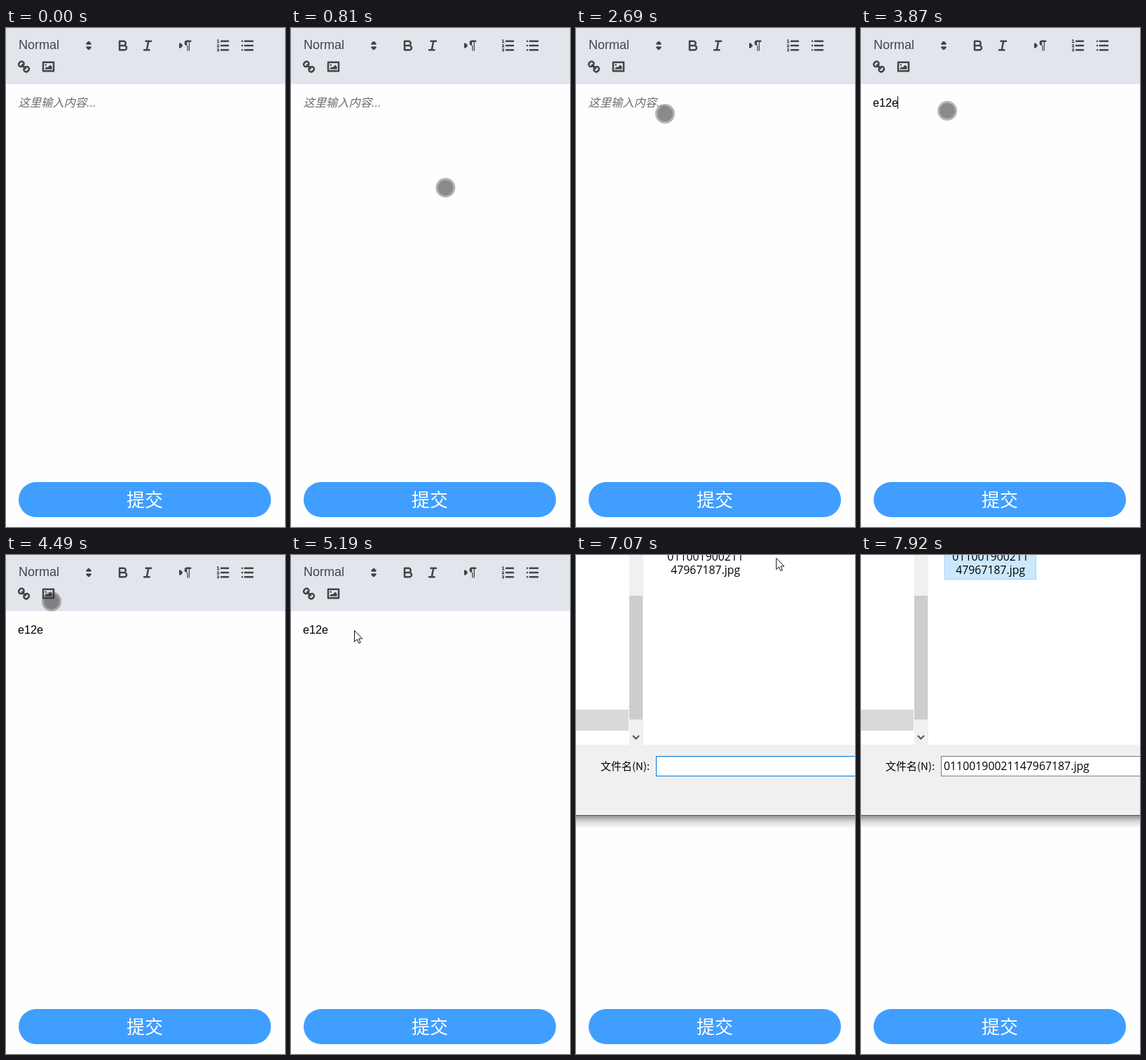
An HTML page that plays this animation: 398x710 px, repeating every 8000 ms.

```html
<!DOCTYPE html>
<html lang="zh-CN">
<head>
<meta charset="utf-8">
<title>Editor</title>
<style>
  html, body { margin: 0; width: 100%; height: 100%; overflow: hidden; background: #fefefe; }
  #stage { display: block; width: 398px; height: 710px; }
  text { white-space: pre; }
  .page { font-family: "Liberation Sans", "Noto Sans CJK SC", "Noto Sans CJK", sans-serif; font-size: 16.25px; }
  .cjk { font-family: "Noto Sans CJK SC", "Noto Sans CJK", sans-serif; }
  .file { font-family: "Open Sans", "Noto Sans", sans-serif; font-size: 15.85px; }
  .icon { fill: none; stroke: #444; stroke-width: 2; stroke-linecap: round; stroke-linejoin: round; }
  .icon .thin { stroke-width: 1; }
  .icon .solid { fill: #444; stroke: none; }
  .icon .both { fill: #444; }
</style>
</head>
<body>
<svg id="stage" viewBox="0 0 398 710">
  <defs>
    <linearGradient id="shade" x1="0" y1="0" x2="0" y2="1">
      <stop offset="0" stop-opacity=".42"/>
      <stop offset=".45" stop-opacity=".15"/>
      <stop offset="1" stop-opacity="0"/>
    </linearGradient>
  </defs>
  <rect width="398" height="710" fill="#fefefe"/>
  <g class="page">
    <rect width="398" height="80" fill="#e3e5ed"/>
    <text x="18" y="30" font-size="18" fill="#444">Normal</text>
    <g id="icons"></g>
    <text id="hint" x="17.4" y="112" font-style="italic" fill="#6c6c6c">这里输入内容...</text>
    <text id="typed" x="17" y="112"></text>
    <rect id="caret" y="97" width="1" height="18"/>
  </g>
  <rect x="18" y="646" width="360" height="50" rx="25" fill="#409eff"/>
  <text class="cjk" x="198" y="680.5" font-size="26" font-weight="500" fill="#fff" text-anchor="middle">提交</text>

  <g id="dialog">
    <rect y="371" width="398" height="18" fill="url(#shade)"/>
    <rect width="398" height="270" fill="#fff"/>
    <rect y="220" width="75" height="30" fill="#d9d9d9"/>
    <rect x="76" width="20" height="270" fill="#f0f0f0"/>
    <rect id="thumb" x="76" y="58" width="19" height="176"/>
    <path d="M81 257l4.5 4.5l4.5-4.5" fill="none" stroke="#505050" stroke-width="2"/>
    <rect id="pick" x="119.5" y="-100" width="130" height="134.5"/>
    <g class="file" text-anchor="middle">
      <text x="184.7" y="7.5">011001900211</text>
      <text x="184.7" y="27.3">47967187.jpg</text>
    </g>
    <rect y="270" width="398" height="100" fill="#f0f0f0"/>
    <rect y="370" width="398" height="1" fill="#555"/>
    <text class="cjk" x="35" y="306" font-size="15">文件名(N):</text>
    <rect id="field" x="114.5" y="286.5" width="300" height="28" fill="#fff"/>
    <text id="name" class="file" x="118" y="306">01100190021147967187.jpg</text>
    <rect id="bar" x="118" y="290" width="1" height="20"/>
  </g>

  <g id="touch" fill="#3c3c3c">
    <circle r="14" fill-opacity=".38"/>
    <circle r="11" fill-opacity=".34"/>
  </g>
  <path id="arrow" d="M.5.5V16.5L4.3 13L6.8 18.6L9.2 17.5L6.8 12H11.7Z" fill="#fff" stroke="#111"/>
</svg>
<script>
const LOOP = 8000, TICK = 78;
const OPEN = 5345, HOVER = 7300, PICK = 7600;
const $ = id => document.getElementById(id);
const el = Object.fromEntries([...document.querySelectorAll('#stage [id]')].map(n => [n.id, n]));

const path = (d, cls = '') => `<path class="${cls}" d="${d}"/>`;
const rows = draw => [4, 9, 14].map(draw).join('');
const lines = x => path(rows(y => `M${x} ${y}H15`));
const link = path('M9 9L11 11M8.9 4.6a3.5 3.5 0 0 1-4.3 4.3C3.2 7.5 2 6.4 4.2 4.2S7.5 3.2 8.9 4.6Z');

// Toolbar icons, drawn on an 18-unit grid
const art = {
  sort: path('M7 11L9 13L11 11ZM7 7L9 5L11 7Z', 'both'),
  bold: path('M5 4H9.5A2.5 2.5 0 0 1 9.5 9H5ZM5 9H10.5A2.5 2.5 0 0 1 10.5 14H5Z'),
  italic: path('M7 4H13M5 14H11M8 14L10 4'),
  direction: path('M3 11L5 9L3 7Z', 'both') + path('M15 4H11') +
    path('M11 3a3 3 0 0 0 0 6h1V3ZM11 4h1v11h-1ZM13 4h1v11h-1Z', 'solid'),
  ordered: lines(7) + path('M2.5 5.5H4.5M2.5 2.8L3.5 2.4V5.5M4.5 10.5h-2L4.3 8.3L2.5 8' +
    'M2.5 12.8H4.3L3.7 14L4.3 15H2.5', 'thin'),
  bullet: lines(6) + path(rows(y => `M3 ${y}h0`)),
  link: link + `<g transform="rotate(180 9 9)">${link}</g>`,
  image: path('M3 4H15V14H3Z') +
    path('M5 7a1 1 0 0 0 2 0a1 1 0 0 0-2 0M5 12V11L7 9L8 10L11 7L13 9V12Z', 'solid')
};

// Lays out button groups left to right; groups are split by a gap
function toolbar(x, y, ...groups) {
  return groups.map(group => {
    const html = group.map((name, i) =>
      `<g class="icon" transform="translate(${x + 35 * i} ${y}) scale(1.25) translate(-9 -9)">${art[name]}</g>`);
    x += 35 * group.length + 18.75;
    return html.join('');
  }).join('');
}
el.icons.innerHTML = toolbar(118, 25, ['sort']) +
  toolbar(167, 25, ['bold', 'italic'], ['direction'], ['ordered', 'bullet']) +
  toolbar(25.5, 55, ['link', 'image']);

// Pointer legs: start, end, destination; each leg leaves from the last stop
const leg = (start, end, x, y) => ({ start, end, x, y });
const touchLegs = [
  leg(330, 330, 291, 720),
  leg(330, 570, 278, 315),
  leg(570, 900, 192, 184),
  leg(900, 1050, 190, 221),
  leg(1120, 1600, 63, 88),
  leg(1600, 1840, 83, 106),
  leg(2000, 2310, 63, 73),
  leg(2380, 2690, 127, 122),
  leg(3790, 4170, 114, 108),
  leg(4260, 4490, 65, 66)
];
const arrowLegs = [
  leg(5100, 5190, 90, 107),
  leg(5580, 5814, 272, 40),
  leg(5814, 5970, 280, 48),
  leg(6120, 6520, 263, 20),
  leg(6820, 7130, 288, 2)
];

const ramp = (t, a, b) => Math.min(1, Math.max(0, (t - a) / (b - a)));
const easeOut = u => 1 - (1 - u) ** 1.6;
const lerp = (a, b, u) => a + (b - a) * u;
const grade = (a, b, u) => `rgb(${a.map((v, i) => Math.round(lerp(v, b[i], u)))})`;

// The pointer is sampled in ticks, so it moves in small jumps
function locate(legs, t) {
  let { x, y } = legs[0];
  for (const { start, end, x: toX, y: toY } of legs) {
    if (t < start) break;
    const ticks = Math.max(1, Math.round((end - start) / TICK));
    const u = easeOut(Math.floor(ramp(t, start, end || 1) * ticks + 0.05) / ticks);
    x = lerp(x, toX, u);
    y = lerp(y, toY, u);
  }
  return `translate(${x.toFixed(1)} ${y.toFixed(1)})`;
}

function show(node, on) {
  node.style.display = on ? '' : 'none';
}

function place(node, legs, t, from, to) {
  show(node, t >= from && t < to);
  node.setAttribute('transform', locate(legs, t));
}

const blink = (t, since, period) => Math.floor((t - since) / period) % 2 === 0;
const keyTimes = [3150, 3320, 3390, 3560];

function draw(t) {
  const count = keyTimes.filter(k => t >= k).length;
  show(el.hint, !count);
  el.typed.textContent = 'e12e'.slice(0, count);
  show(el.caret, count && blink(t, keyTimes[count - 1], 510));
  el.caret.setAttribute('x', 16 + Math.round(count * 9.04));

  show(el.dialog, t >= OPEN);
  el.thumb.setAttribute('fill', grade([166, 166, 166], [205, 205, 205], ramp(t, 5770, 5950)));
  show(el.pick, t >= HOVER);
  el.pick.setAttribute('fill', t < PICK ? '#e5f3ff' : '#cce8ff');
  el.pick.setAttribute('stroke', t < PICK ? '#e5f3ff' : '#99d1ff');
  el.field.setAttribute('stroke', grade([0, 120, 215], [122, 122, 122], ramp(t, PICK, 7900)));
  show(el.name, t >= PICK);
  show(el.bar, t < PICK && blink(t, 5400, 530));

  place(el.touch, touchLegs, t, 410, 5100);
  place(el.arrow, arrowLegs, t, 5100, 7130);
}

function tick() {
  draw(performance.now() % LOOP);
  requestAnimationFrame(tick);
}
tick();
</script>
</body>
</html>
```
